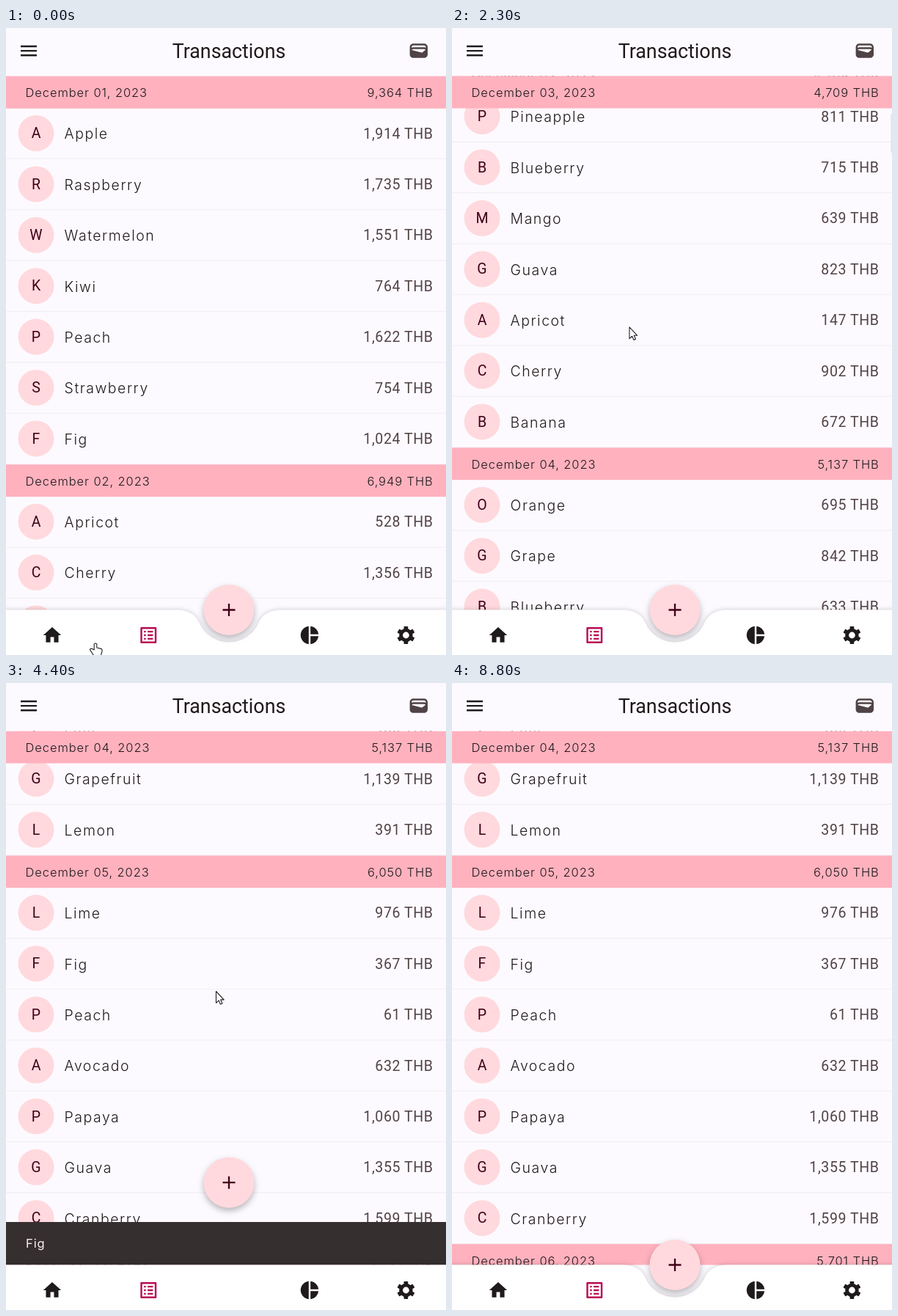
Animation, 600 px wide and 855 px high, one loop 9.9 s. Source, as an HTML page:

```html
<!DOCTYPE html>
<html lang="en">
<head>
<meta charset="utf-8">
<title>Transactions</title>
<style>
  html, body { margin: 0; width: 100%; height: 100%; overflow: hidden; background: #fdfaff; }
  svg { display: block; width: 600px; height: 855px; }
  text { font-family: Roboto, sans-serif; font-size: 19.5px; fill: #201a1b; }
  .title { font-size: 26.8px; text-anchor: middle; }
  .name { font-family: Inter, sans-serif; font-size: 19.5px; font-weight: 300; letter-spacing: 1.5px; }
  .amount { letter-spacing: .6px; text-anchor: end; fill: #524345; }
  .initial { text-anchor: middle; fill: #3f0018; }
  .day, .sum, .toast { font-family: Inter, sans-serif; font-size: 16.5px; font-weight: 300; letter-spacing: .9px; }
  .sum { text-anchor: end; }
  .toast { fill: #fbeeee; font-weight: 400; }
  .band { fill: #ffb1be; }
  .disc { fill: #ffd9dd; }
  .rule { fill: #f3eef4; }
  .paper { fill: #fdfaff; }
  #bar { fill: #fff; filter: drop-shadow(0 0 3px rgba(0,0,0,.2)); }
  #fab circle { filter: drop-shadow(0 4px 4px rgba(0,0,0,.28)); }
  #cursor path { fill: #fff; stroke: #222; stroke-width: 1.1; stroke-linejoin: round; }
</style>
</head>
<body>
<svg viewBox="0 0 600 855">
  <defs>
    <clipPath id="body"><rect y="65.6" width="600" height="727.9"/></clipPath>
  </defs>
  <rect class="paper" width="600" height="855"/>
  <g clip-path="url(#body)">
    <g id="list"></g>
    <g id="pinned"></g>
    <rect id="thumb" x="598.4" width="1.6" height="53" fill="#cfc8cf"/>
    <g id="snack">
      <rect width="600" height="60" fill="#362f30"/>
      <text class="toast" x="27" y="35"></text>
    </g>
  </g>
  <text class="title" x="304" y="40.6">Transactions</text>
  <path id="bar"/>
  <g id="icons"></g>
  <g id="fab">
    <circle class="disc" r="34.5"/>
    <path d="M-8.5 0H8.5M0-8.5V8.5" stroke="#3f0018" stroke-width="2.3"/>
  </g>
  <g id="cursor">
    <path id="arrow" d="M.5 .5V16.3L4.1 12.9 6.4 18 9 16.9 6.7 11.9H11.2Z"/>
    <path id="hand" d="M-1.8 9V1Q0-1 1.8 1V6L8 7.6Q9.3 8.2 9 11L7.5 16.5H-2.5L-7.6 8.6Q-7 6.4-4.6 7.4Z"/>
  </g>
</svg>
<script>
const LOOP = 9900, STEP = 100;
const TOP = 65.6, BAR = 793.5, HEAD = 43.9, ROW = 69.4, SECTION = HEAD + 7 * ROW;
const SNACK = 58.5, FAB_R = 34.5;

const days = [
  'Apple 1914,Raspberry 1735,Watermelon 1551,Kiwi 764,Peach 1622,Strawberry 754,Fig 1024',
  'Apricot 528,Cherry 1356,Nectarine 232,Coconut 1250,Banana 1259,Plum 622,Peach 1702',
  'Pineapple 811,Blueberry 715,Mango 639,Guava 823,Apricot 147,Cherry 902,Banana 672',
  'Orange 695,Grape 842,Blueberry 633,Cherry 451,Lime 986,Grapefruit 1139,Lemon 391',
  'Lime 976,Fig 367,Peach 61,Avocado 632,Papaya 1060,Guava 1355,Cranberry 1599',
  'Mango 5701'
].map(day => day.split(',').map(item => {
  const [name, price] = item.split(' ');
  return { name, price: +price };
}));

const $ = id => document.getElementById(id);
const thb = n => n.toLocaleString('en-US') + ' THB';
const label = (cls, x, y, s) => `<text class="${cls}" x="${x}" y="${y}">${s}</text>`;

function header(day, y) {
  const total = days[day].reduce((sum, item) => sum + item.price, 0);
  return `<rect class="band" y="${y}" width="600" height="${HEAD}"/>` +
    label('day', 26.6, y + 28.4, `December 0${day + 1}, 2023`) +
    label('sum', 582.7, y + 28.4, thb(total));
}

function row({ name, price }, y) {
  const mid = y + 34;
  return `<circle class="disc" cx="41" cy="${mid}" r="24.5"/>` +
    label('initial', 41, mid + 6.6, name[0]) +
    label('name', 79.6, mid + 7.8, name) +
    label('amount', 582.6, mid + 7, thb(price)) +
    `<rect class="rule" y="${y + ROW - 1.2}" width="600" height="1.2"/>`;
}

$('list').innerHTML = days.map((items, day) => {
  const y = TOP + day * SECTION;
  return header(day, y) + items.map((item, i) => row(item, y + HEAD + i * ROW)).join('');
}).join('');

// Icons are drawn on a 24 unit grid
const icon = (x, y, fill, shape) =>
  `<g transform="translate(${x} ${y}) scale(1.22) translate(-12 -12)" fill="${fill}">${shape}</g>`;
const path = d => `<path fill-rule="evenodd" d="${d}"/>`;
const gear = '<circle cx="12" cy="12" r="5.6" fill="none" stroke="#1f1a1c" stroke-width="4"/>' +
  [0, 60, 120, 180, 240, 300].map(a =>
    `<rect x="9.7" y="2.1" width="4.6" height="5" rx=".5" transform="rotate(${a} 12 12)"/>`).join('');
const dots = [7, 11, 15].map(y => `M11 ${y}h6v2h-6zM7 ${y}h2v2H7z`).join('');

$('icons').innerHTML =
  icon(31, 31.1, '#1f1a1c', path('M3 6h18v2H3zM3 11h18v2H3zM3 16h18v2H3z')) +
  icon(562.8, 31.1, '#4f4345', path('M18 4H6C3.8 4 2 5.8 2 8v8c0 2.2 1.8 4 4 4h12c2.2 0 4-1.8 4-4V8c0-2.2-1.8-4-4-4z' +
    'M16.1 13.8c-.2.2-.6.3-.9.2L4.1 11.2C4.5 10.5 5.2 10 6 10h12c.7 0 1.3.3 1.6.8z' +
    'M6 6h12c1.1 0 2 .9 2 2v.5C19.4 8.2 18.7 8 18 8H6c-.7 0-1.4.2-2 .5V8c0-1.1.9-2 2-2z')) +
  icon(63, 828, '#1f1a1c', path('M10 20v-6h4v6h5v-8h3L12 3 2 12h3v8z')) +
  icon(194.3, 828, '#b90c55', path('M4 3H20Q21 3 21 4V20Q21 21 20 21H4Q3 21 3 20V4Q3 3 4 3ZM5 5V19H19V5Z' + dots)) +
  icon(414, 828, '#1f1a1c', path('M11 2.05v19.9a10 10 0 0 1 0-19.9zM13 2.05V11h8.95a10 10 0 0 0-8.95-8.95zM13 13v8.95a10 10 0 0 0 8.95-8.95z')) +
  icon(545.4, 828, '#1f1a1c', gear);

const flatBar = `M-9 ${BAR}H609V870H-9Z`;
const notchedBar = `M-9 ${BAR}H232q24 0 31.6 17.5A44 44 0 0 0 344.4 ${BAR + 17.5}q7.6-17.5 31.6-17.5H609V870H-9Z`;

// Monotone cubic through [time, value] points
function track(points) {
  const slope = i => (points[i + 1][1] - points[i][1]) / (points[i + 1][0] - points[i][0]);
  const tangent = i => {
    if (i === 0 || i === points.length - 1) return 0;
    const a = slope(i - 1), b = slope(i);
    return a * b <= 0 ? 0 : 2 * a * b / (a + b);
  };
  return t => {
    if (t <= points[0][0]) return points[0][1];
    const i = points.findIndex((p, k) => k < points.length - 1 && t < points[k + 1][0]);
    if (i < 0) return points[points.length - 1][1];
    const [t0, v0] = points[i], [t1, v1] = points[i + 1];
    const d = t1 - t0, u = (t - t0) / d, w = 1 - u;
    return v0 * w * w * (1 + 2 * u) + v1 * u * u * (3 - 2 * u) +
      d * u * w * (w * tangent(i) - u * tangent(i + 1));
  };
}

const scrollAt = track([[1200, 0], [1300, 97.5], [2000, 682], [2700, 1656], [2900, 1855], [3200, 1945.5], [3500, 1949]]);
const pointer = [
  [0, 122, 839], [800, 243, 395], [1300, 243, 395], [2000, 242, 405], [2700, 241, 409], [3200, 241, 409],
  [3800, 287, 389], [4000, 287, 389], [4400, 286, 420], [5300, 286, 420], [6300, 175, 603],
  [6400, 174, 603], [7800, 174, 604], [8700, 128, 866]
];
const cursorX = track(pointer.map(p => [p[0], p[1]]));
const cursorY = track(pointer.map(p => [p[0], p[2]]));

// cubic-bezier(.4, 0, .2, 1)
function ease(x) {
  let lo = 0, hi = 1;
  for (let i = 0; i < 24; i++) {
    const u = (lo + hi) / 2, w = 1 - u;
    if (1.2 * w * w * u + .6 * w * u * u + u ** 3 < x) lo = u; else hi = u;
  }
  return lo * lo * (3 - 2 * lo);
}

const clamp = x => Math.min(1, Math.max(0, x));
const toasts = [{ start: 4050, text: 'Fig' }, { start: 6550, text: 'Papaya' }];
const toastText = document.querySelector('.toast');
let pinnedDay = -1;

function draw(t) {
  const scroll = scrollAt(t);
  $('list').setAttribute('transform', `translate(0 ${-scroll})`);
  const day = Math.floor(scroll / SECTION);
  if (day !== pinnedDay) $('pinned').innerHTML = header(pinnedDay = day, TOP);
  $('thumb').setAttribute('y', 68.5 + .0447 * scroll);
  $('thumb').setAttribute('opacity', .5 * clamp((t - 1300) / 300) * clamp((3200 - t) / 400));

  const toast = toasts[t < 6500 ? 0 : 1], age = t - toast.start;
  const open = ease(clamp(Math.min(age, 1550 - age) / 250));
  const height = open > .001 ? SNACK * open : 0;
  toastText.textContent = toast.text;
  toastText.setAttribute('opacity', clamp((open - .4) / .6));
  $('snack').setAttribute('transform', `translate(0 ${BAR - height})`);
  $('bar').setAttribute('d', height ? flatBar : notchedBar);
  $('fab').setAttribute('transform', `translate(304 ${height ? BAR - height - FAB_R - 19.3 : BAR})`);

  const x = cursorX(t), y = cursorY(t);
  $('cursor').setAttribute('transform', `translate(${x} ${y})`);
  $('hand').style.display = y > BAR ? '' : 'none';
  $('arrow').style.display = y > BAR ? 'none' : '';
}

const begin = performance.now();
function tick() {
  const t = (performance.now() - begin + 2) % LOOP;
  draw(Math.floor(t / STEP) * STEP);
  requestAnimationFrame(tick);
}
tick();
</script>
</body>
</html>
```
